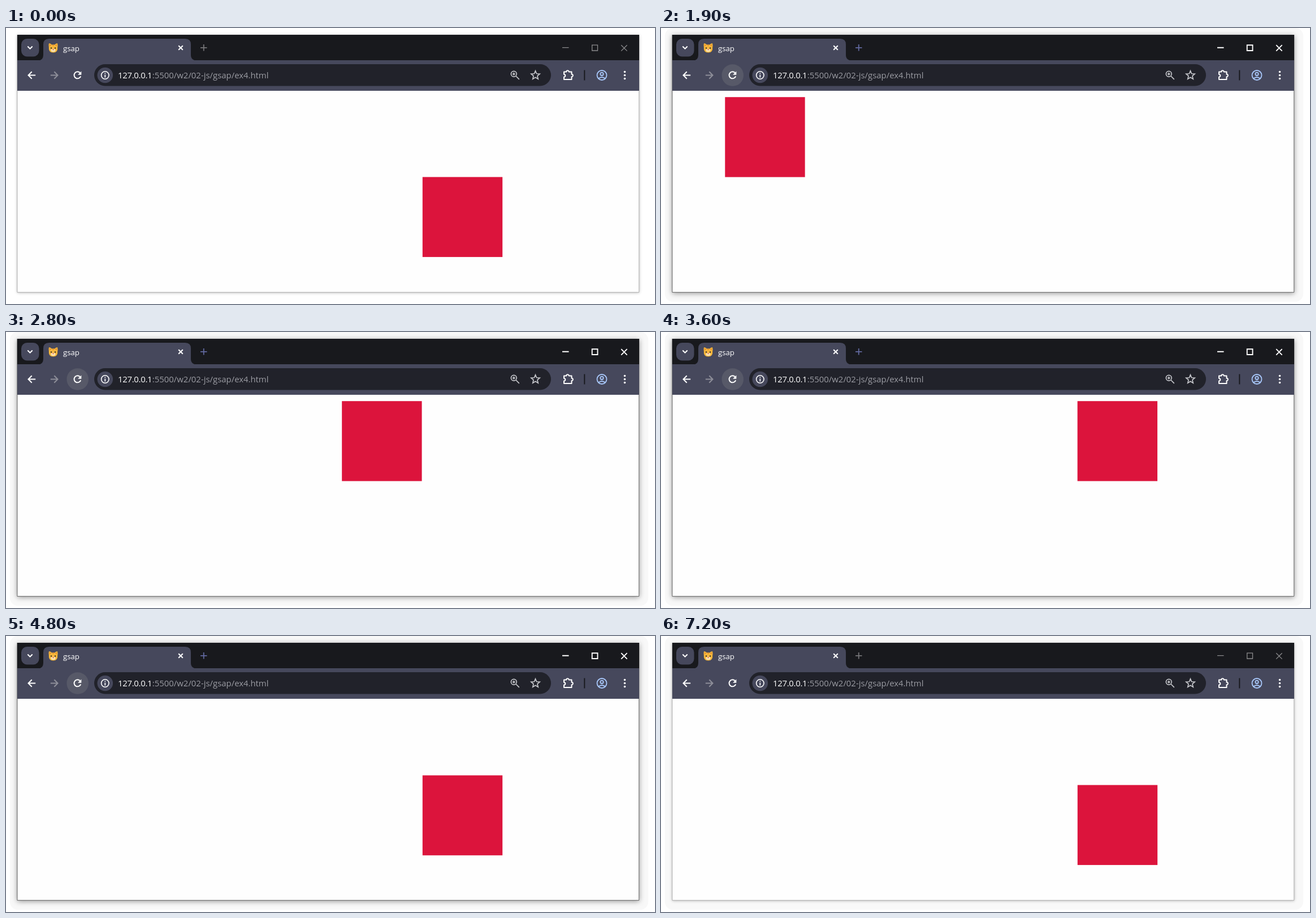
Animation of 1148 by 488 pixels, one loop 7400 ms. Source, as an HTML page:

```html
<!DOCTYPE html>
<html lang="en">
<head>
<meta charset="utf-8">
<title>gsap</title>
<style>
  html, body { margin: 0; width: 100%; height: 100%; overflow: hidden; background: #fff; }
  body { position: relative; }
  #halo { position: absolute; left: 7px; top: 0; width: 1129px; height: 484px; border-radius: 14px; background: #f8f8f8; }
  #frame { position: absolute; left: 20px; top: 12px; width: 1100px; height: 455px; }
  svg { position: absolute; left: 0; top: 0; }
  text { font-family: "Open Sans", "Noto Sans", sans-serif; fill: #fff; }
  .line { fill: none; stroke: #fff; stroke-width: 2; }
  .soft { stroke: #c4c5ca; stroke-width: 1.7; }
  .user { stroke: #a8c7fa; stroke-width: 1.8; }
</style>
</head>
<body>
<div id="halo"></div>
<div id="frame"></div>
<svg width="1148" height="488" viewBox="0 0 1148 488">
  <rect x="20" y="12" width="1100" height="455" fill="#fefefe"/>
  <rect id="box" width="141.4" height="141.4" fill="#dc143c"/>
  <path id="border" class="line" d="M19.9 12V467.3H1119.7V12" style="stroke-width:1"/>

  <!-- title bar and tab -->
  <rect x="20" y="12" width="1100" height="46" fill="#18191d"/>
  <rect x="27" y="19" width="31.5" height="31.5" rx="10" fill="#46485c"/>
  <path class="line" d="M38.3 32.5l4.2 4.2 4.2-4.2"/>
  <path fill="#46485c" d="M56 57.5q10 0 10-10V29q0-10 10-10H317q10 0 10 10V47.5q0 10 11 10z"/>
  <g>
    <path fill="#f6b73c" d="M76 27q3 0 5 2.5h5Q88 27 91 27q1 4 .2 7 1 9.500-7.700 9.500T75.800 34Q75 30 76 27z"/>
    <path fill="#e58b2b" d="M77 28.500l3 2-2.500 2zM90 28.500l-3 2 2.500 2zM82.700 29h1.600v3h-1.600z"/>
    <ellipse cx="83.500" cy="39.500" rx="4" ry="2.800" fill="#fbe3b0"/>
    <circle cx="80" cy="35.500" r="1.200" fill="#3b3028"/>
    <circle cx="87" cy="35.500" r="1.200" fill="#3b3028"/>
    <circle cx="83.500" cy="38.200" r="1.100" fill="#d9605a"/>
  </g>
  <text x="101" y="41" font-size="13.2">gsap</text>
  <path class="line" d="M305.200 31.200l7.600 7.600m0-7.600l-7.600 7.600"/>
  <path id="plus" class="line" d="M344 34.800h11.500M349.750 29v11.500" style="stroke-width:1.800"/>
  <path id="controls" class="line" d="M984 34.700h11.500M1036.700 30.200h9.800v9.800h-9.800zM1088.200 30.200l10.400 10.400m0-10.400l-10.400 10.400"/>

  <!-- toolbar -->
  <rect x="20" y="57" width="1100" height="54" fill="#46485c"/>
  <path class="line" d="M52.200 83.500H39.800M45.700 77.300l-6.200 6.200 6.200 6.200"/>
  <path class="line" d="M78.800 83.500H91.200M85.300 77.300l6.200 6.200-6.200 6.200" style="stroke:#8d8e99"/>
  <circle id="hover" cx="126.700" cy="83.500" r="19.300" fill="#575968"/>
  <path class="line" d="M131 79.300A6 6 0 1 0 132.200 85.300"/>
  <path d="M133.300 76.500v6.200h-6.200z" fill="#fff"/>
  <rect x="156" y="64" width="808" height="38.500" rx="19.250" fill="#21222a"/>
  <circle cx="175.300" cy="83.500" r="13.800" fill="#46485c"/>
  <circle class="line" cx="175.300" cy="83.500" r="6.700" style="stroke-width:1.600"/>
  <path class="line" d="M175.300 79.400v1.700m0 1.500v5" style="stroke-width:1.700"/>
  <text x="198" y="89" font-size="14.900" letter-spacing="-.3">127.0.0.1</text>
  <text x="258.800" y="89" font-size="14.900" style="fill:#9b9ca3">:5500/w2/02-js/gsap/ex4.html</text>
  <g class="line soft">
    <circle cx="898.300" cy="81.300" r="4.900"/>
    <path d="M902 85l5.800 5.800M895.800 81.300h5M898.300 78.800v5"/>
    <path d="M936.500 75.800l2.100 5 5.500.400-4.200 3.600 1.300 5.300-4.700-2.900-4.700 2.900 1.300-5.300-4.200-3.600 5.500-.4z"/>
  </g>
  <path class="line" stroke-linejoin="round" d="M987 77.500h4.200a2.300 2.300 0 0 1 4.600 0h4.700v4.200a2.300 2.300 0 0 1 0 4.600v4.700H987v-4.400a2.300 2.300 0 0 0 0-4.600z"/>
  <rect x="1022.300" y="74.500" width="2" height="18" fill="#191a20"/>
  <g class="line user">
    <circle cx="1054" cy="83.500" r="8.500"/>
    <circle cx="1054" cy="81.300" r="2.700"/>
    <path d="M1048.200 89.300q5.800-4.600 11.600 0"/>
  </g>
  <g fill="#fff">
    <circle cx="1094.500" cy="77.500" r="1.800"/>
    <circle cx="1094.500" cy="83.500" r="1.800"/>
    <circle cx="1094.500" cy="89.500" r="1.800"/>
  </g>
</svg>
<script>
  const LOOP = 7400, STEP = 100, RELOAD = 1400;
  const [halo, frame, box, border, plus, controls, hover] =
    ["halo", "frame", "box", "border", "plus", "controls", "hover"].map(id => document.getElementById(id));

  const span = (t, start, length) => Math.min(1, Math.max(0, (t - start) / length));
  const easeOut = p => 1 - (1 - p) ** 2;
  const mix = (from, to, p) =>
    `rgb(${from.map((c, i) => Math.round(c + (to[i] - c) * p))})`;

  function drawBox(t) {
    const x = 31.2 + 705.6 * (t > 1800 ? easeOut(span(t, 1790, 1835)) : 0);
    const y = 122.2 + 141.3 * easeOut(span(t, 3600, 1840));
    const angle = 360 * easeOut(span(t, 5440, 905));
    box.setAttribute("transform", `translate(${x} ${y}) rotate(${angle} 70.7 70.7)`);
  }

  function drawWindow(t) {
    const focused = span(t, 800, 300);
    const active = t < 7200 ? focused : 0;
    halo.style.opacity = focused;
    frame.style.boxShadow =
      `0 ${1 + active}px ${5 + 4 * active}px rgba(0, 0, 0, ${0.3 + 0.12 * active})`;
    border.style.stroke = mix([176, 176, 176], [98, 98, 98], active);
    plus.style.stroke = mix([117, 117, 120], [98, 105, 160], active);
    controls.style.stroke = mix([139, 139, 141], [255, 255, 255], active);
    controls.style.strokeWidth = 1.3 + 0.6 * active;
    hover.style.opacity = span(t, 800, 300) - span(t, 6150, 250);
  }

  function draw(now) {
    const t = Math.floor((now % LOOP) / STEP) * STEP;
    // Until the reload the page still shows the finished run.
    drawBox(t < RELOAD ? t + LOOP : t);
    drawWindow(t);
    requestAnimationFrame(draw);
  }
  draw(performance.now());
</script>
</body>
</html>
```
